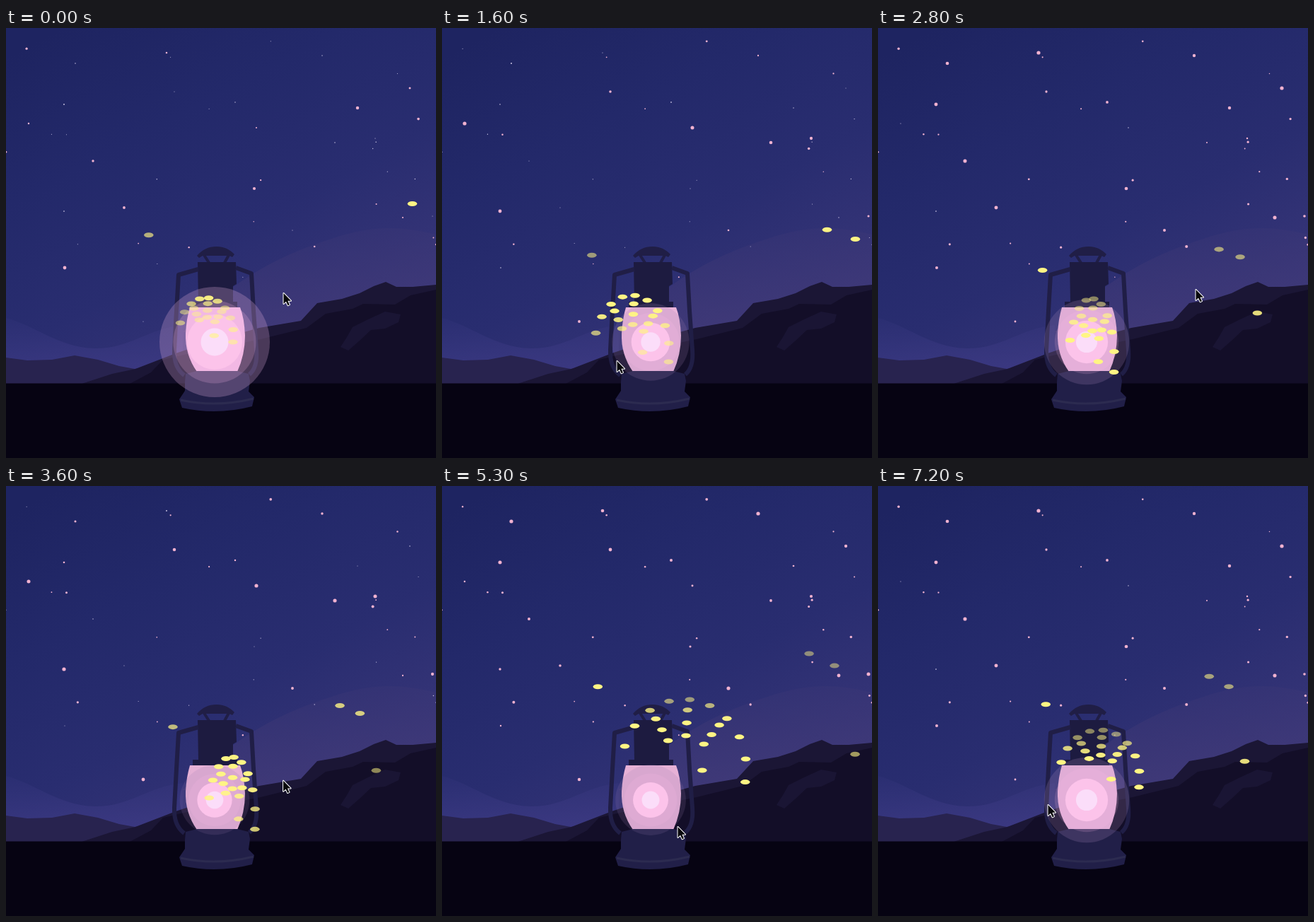
Animation, 608 px wide and 608 px high, one loop 7300 ms. Source, as an HTML page with a canvas:

```html
<!DOCTYPE html>
<html lang="en">
<head>
<meta charset="utf-8">
<title>Lantern and fireflies</title>
<style>
  html, body { margin: 0; width: 100%; height: 100%; overflow: hidden; background: #060312; }
  canvas { display: block; }
</style>
</head>
<body>
<canvas id="stage" width="608" height="608"></canvas>
<script>
const ctx = document.getElementById('stage').getContext('2d');
const LOOP = 7300, STEP = 100, PULSE = 2200;
const TAU = Math.PI * 2, DEG = Math.PI / 180;
const LAMP = { x: 295, y: 444 };

let seed = 11;
const random = () => (seed = seed * 16807 % 2147483647) / 2147483647;

// 0..1 cosine pulse that peaks at the given phase
const pulse = (t, peak) => (1 + Math.cos(TAU * (t / PULSE - peak))) / 2;

// Key poses: time, then pointer position and the swarm's centre, scale and outer scale
const poses = [
  { time: 0,    pointer: [392, 374], swarm: [283, 434, .42, .57, 1.21, .85] },
  { time: 1600, pointer: [247, 470], swarm: [268, 457, .58, .86, 1.08, .69] },
  { time: 2800, pointer: [449, 369], swarm: [302, 470, .35, .95, .81, .57] },
  { time: 4400, pointer: [307, 479], swarm: [333, 457, .49, .93, .79, .65] },
  { time: 5300, pointer: [333, 481], swarm: [342, 400, .96, 1.07, .97, .9] },
  { time: 6100, pointer: [403, 472], swarm: [325, 375, 1, 1, 1, 1] },
  { time: 7200, pointer: [240, 450], swarm: [313, 413, .62, .74, .75, .76] }
];

// Smooth curve through one property of the poses
function at(t, key) {
  const last = poses.length - 1;
  let i = 0;
  while (i < last - 1 && t >= poses[i + 1].time) i++;
  const span = poses[i + 1].time - poses[i].time, u = (t - poses[i].time) / span;
  const slope = (k, c) => {
    const a = poses[Math.max(0, k - 1)], b = poses[Math.min(last, k + 1)];
    return (b[key][c] - a[key][c]) / (b.time - a.time) * span;
  };
  return poses[i][key].map((p, c) => {
    const q = poses[i + 1][key][c], m = slope(i, c), n = slope(i + 1, c);
    return p + u * (m + u * (3 * (q - p) - 2 * m - n + u * (2 * (p - q) + m + n)));
  });
}

// The swarm is a fan: an outer arc, three inner spokes and one fly near the centre
const fan = [];
function addFly(angle, radius) {
  const x = radius * Math.cos(angle * DEG), y = radius * Math.sin(angle * DEG);
  fan.push({ x, y, peak: .35 + .55 * (y / 100) ** 2 });
}
for (let i = 0; i < 10; i++) addFly(199 + 19.1 * i, 92);
for (const angle of [238, 274, 312])
  for (let row = 0; row < 3; row++) addFly(angle, 78 - 17 * row);
addFly(4, 27);

// Flies far out, relative to the lamp
const strays = [
  { x: -77, y: -178, peak: .33 },
  { x: 231, y: -230, peak: .9 },
  { x: 268, y: -211, peak: .9 },
  { x: 298, y: -72, peak: .05 }
];

// Bright stars in the order in which they light up, then faint scattered ones
const bright = [[83, 339], [497, 113], [351, 227], [167, 254], [123, 188], [571, 85], [227, 35],
  [561, 268], [82, 108], [98, 50], [447, 39], [405, 286], [603, 266], [238, 90], [194, 415],
  [522, 156], [465, 162], [82, 259], [354, 141], [32, 135]];
const stars = bright.map(([x, y], i) => ({ x, y, size: 2.1, peak: .1 + .6 * i / 19 }));
for (let i = 0; i < 26; i++)
  stars.push({ x: random() * 608, y: 10 + random() * 370, size: .6 + random(), peak: .1 + .5 * random() });

function gradient(x0, y0, x1, y1, ...stops) {
  const g = ctx.createLinearGradient(x0, y0, x1, y1);
  stops.forEach((c, i) => g.addColorStop(i / (stops.length - 1), c));
  return g;
}
function fill(style, path) {
  ctx.fillStyle = style;
  ctx.fill(new Path2D(path));
}
function stroke(style, width, path) {
  ctx.strokeStyle = style;
  ctx.lineWidth = width;
  ctx.lineJoin = 'round';
  ctx.stroke(new Path2D(path));
}
function ellipse(x, y, rx, ry, style) {
  ctx.fillStyle = style;
  ctx.beginPath();
  ctx.ellipse(x, y, rx, ry, 0, 0, TAU);
  ctx.fill();
}

function drawSky(t) {
  fill(gradient(80, 0, 340, 490, '#1e2461', '#23296a', '#292d70', '#373578'), 'M0 0H608V608H0Z');
  fill(gradient(0, 275, 0, 430, 'rgba(66,58,118,.2)', 'rgba(70,60,120,.6)'),
    'M250 430C330 345 400 318 460 298S560 280 608 292V430Z');
  fill(gradient(0, 405, 0, 480, 'rgba(62,60,134,.1)', 'rgba(64,60,136,.6)'),
    'M0 410C40 420 75 452 125 453S200 425 250 420V490H0Z');
  for (const { x, y, size, peak } of stars) {
    const glow = pulse(t, peak), r = .5 + size * glow;
    ellipse(x, y, r, r, glow > .25 ? '#f1b2d0' : '#cfc8e6');
  }
}

function drawLand() {
  fill('#28234f', 'M0 466L30 470 65 469 97 463 130 469 160 478 182 482 250 470V503H0Z');
  fill('#1b1635', 'M107 503L150 489 183 482 240 460 300 440 358 424 417 414 440 389 475 383 500 375 520 365 537 359 552 366 575 366 608 363V503Z');
  fill('#130e28', 'M175 503L205 487 222 469 260 460 360 440 425 424 452 404 490 397 505 390 550 391 572 378 608 370V503Z');
  fill('#1a1534', 'M473 451L482 437 490 423 512 412 536 401 558 405 555 416 536 425 516 427 500 442 484 456Z');
  fill('#060312', 'M0 502.5H608V608H0Z');
}

function drawLantern(swell) {
  const body = '#211f48', frame = '#201e46';
  fill(frame, 'M270 322C278 313 286 309 298 309S317 314 323 320L320 324 316 322H278L273 325Z');
  stroke(frame, 4, 'M280 321L287 332M315 321L309 332');
  fill('#1d1b40', 'M271 331H325L326 362 321 365V387H327V396H264V387H272Z');
  stroke(frame, 6, 'M272 341L244 349 241 400 238 455Q237 480 252 491M325 339L347 347 350 400 354 455Q356 480 344 490');
  fill(`rgb(${229 + 24 * swell},${176 + 18 * swell},${213 + 21 * swell})`,
    'M260 395H331Q337 410 338 435 338 462 327 486H270Q253 462 254 432 255 412 260 395Z');
  fill(body, 'M254 489L270 485H327L343 489 345 499 343 514 351 522 348 535Q298 548 249 537L245 525 253 513V500Z');
  stroke('#2c2b50', 3, 'M247 526Q297 537 350 524');
}

function drawGlow(swell) {
  const disc = (n, style) => {
    const r = n * (12 + 7.6 * swell);
    ellipse(LAMP.x, LAMP.y, r, r, style);
  };
  disc(4, `rgba(${145 + 60 * swell},${115 + 45 * swell},${170 + 35 * swell},${.16 + .14 * swell})`);
  disc(3, `rgba(255,185,232,${.15 + .05 * swell})`);
  disc(2, '#fcc3ea');
  disc(1, '#fbddf9');
}

function drawFlies(t) {
  const [cx, cy, sx, sy, farX, farY] = at(t, 'swarm');
  const fly = (x, y, peak) => {
    ctx.globalAlpha = Math.min(1, .48 + .7 * pulse(t, peak));
    ellipse(x, y, 6.8, 3.5, '#fff584');
  };
  for (const { x, y, peak } of fan) fly(cx + x * sx, cy + y * sy, peak);
  for (const { x, y, peak } of strays) fly(LAMP.x + x * farX, LAMP.y + y * farY, peak);
  ctx.globalAlpha = 1;
}

function drawPointer(t) {
  const [x, y] = at(t, 'pointer');
  const arrow = 'M.5 1V16L4 12.8 6.6 18.3 9 17.2 6.4 11.8H11Z';
  ctx.save();
  ctx.translate(x, y);
  stroke('#fff', 2, arrow);
  fill('#08080c', arrow);
  ctx.restore();
}

function draw(now) {
  const t = Math.floor(now % LOOP / STEP) * STEP;
  const swell = pulse(t, .03) ** 1.4;
  drawSky(t);
  drawLand();
  drawLantern(swell);
  drawGlow(swell);
  drawFlies(t);
  drawPointer(t);
}

const start = performance.now();
function loop() {
  draw(performance.now() - start);
  requestAnimationFrame(loop);
}
loop();
</script>
</body>
</html>
```
